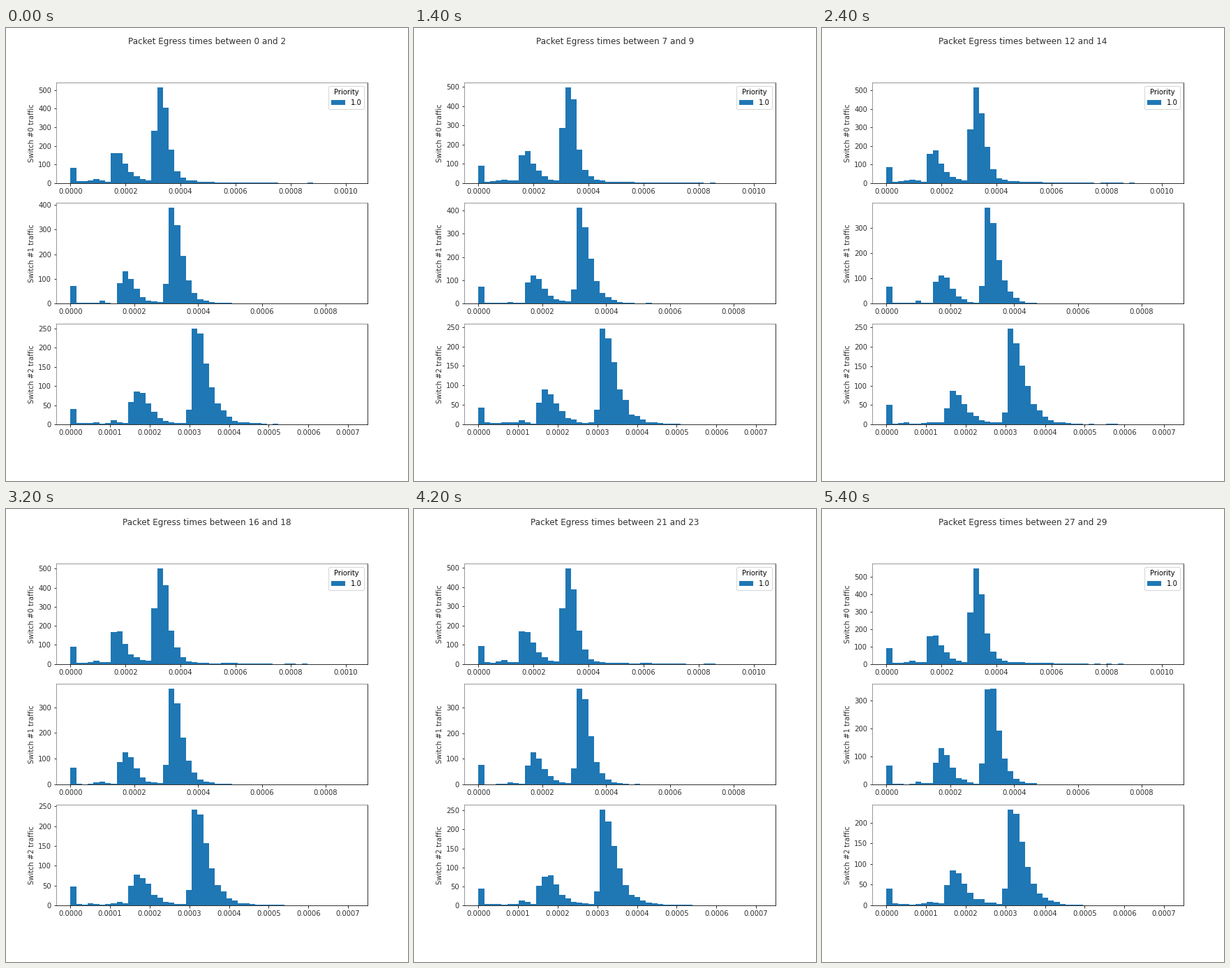
Animation, 576 px wide and 648 px high, one loop 5600 ms. Source, as a matplotlib script:

```python
import matplotlib.pyplot as plt
import numpy as np
from matplotlib.animation import FuncAnimation

FRAMES, BINS = 28, 49
KEYS = [0, 7, 12, 16, 19, 24, 27]
INK, SOFT = "#303030", "#808080"

plt.rcParams.update({
    "font.family": "DejaVu Sans", "font.size": 10, "text.color": INK,
    "axes.labelcolor": INK, "xtick.labelcolor": INK, "ytick.labelcolor": INK,
})

# span: longest delay; spike: undelayed packets; floor: stray packets
# waves: (first bin, fill of that bin, centre, width, height)
# peak: height of the tallest bar at each of KEYS
SWITCHES = [
    dict(span=0.0010287, spike=85, floor=8,
         waves=[(3, 1, 4.2, 0.6, 12), (7, 0.95, 7.5, 1.33, 170),
                (14, 0.93, 15.18, 1.03, 517)],
         peak=[516, 499, 518, 503, 499, 496, 551]),
    dict(span=0.0008877, spike=70, floor=3,
         waves=[(4, 1, 5, 0.5, 8), (8, 0.87, 9.05, 1.35, 125),
                (16, 0.26, 17.25, 1.3, 376)],
         peak=[388, 411, 380, 371, 366, 380, 339]),
    dict(span=0.000714, spike=43, floor=3.5,
         waves=[(7, 1, 7.3, 0.7, 6), (10, 0.78, 11.2, 1.6, 82),
                (20, 0.16, 21.2, 1.72, 245)],
         peak=[250, 246, 247, 242, 247, 261, 232]),
]


def counts(spec, seed):
    """Counts per frame and bin; neighbouring windows share one second."""
    bins = np.arange(BINS)
    mean = spec["floor"] * np.exp(-(bins / 30) ** 4)
    mean[0] = spec["spike"]
    for first, fill, centre, width, height in spec["waves"]:
        wave = height / np.cosh((bins - centre) / width)
        wave[first] *= fill
        mean += np.where(bins >= first, wave, 0)

    z = np.random.default_rng(seed).standard_normal((FRAMES + 1, BINS))
    noise = 0.4 * (z[:-1] + z[1:]) * np.sqrt(mean)
    data = np.maximum(np.round(mean + noise), 0)
    data[:, mean.argmax()] = np.interp(np.arange(FRAMES), KEYS, spec["peak"])
    return data


fig, axes = plt.subplots(3, 1, figsize=(8, 9), dpi=72)
fig.subplots_adjust(left=0.125, right=0.9, bottom=0.125, top=0.88, hspace=0.2)
title = fig.suptitle("", fontsize=12)

plots = []
for n, (ax, spec) in enumerate(zip(axes, SWITCHES)):
    data = counts(spec, 20 + n)
    width = spec["span"] / BINS
    bars = ax.bar(np.arange(BINS) * width, data[0], width, align="edge",
                  color="#1f77b4", label="1.0")
    ax.set_xlim(-0.05 * spec["span"], 1.05 * spec["span"])
    ax.xaxis.set_major_formatter("{x:.4f}")
    ax.set_ylabel(f"Switch #{n} traffic")
    ax.spines[["top", "left"]].set_color(SOFT)
    plots.append((ax, bars, data))

legend = axes[0].legend(title="Priority", loc="upper right", labelcolor="black")
legend.get_title().set_color("black")


def update(i):
    title.set_text(f"Packet Egress times between {i} and {i + 2}")
    for ax, bars, data in plots:
        for bar, h in zip(bars, data[i]):
            bar.set_height(h)
        ax.set_ylim(0, 1.05 * data[i].max())


anim = FuncAnimation(fig, update, frames=FRAMES, interval=200, repeat=True)
plt.show()
```
